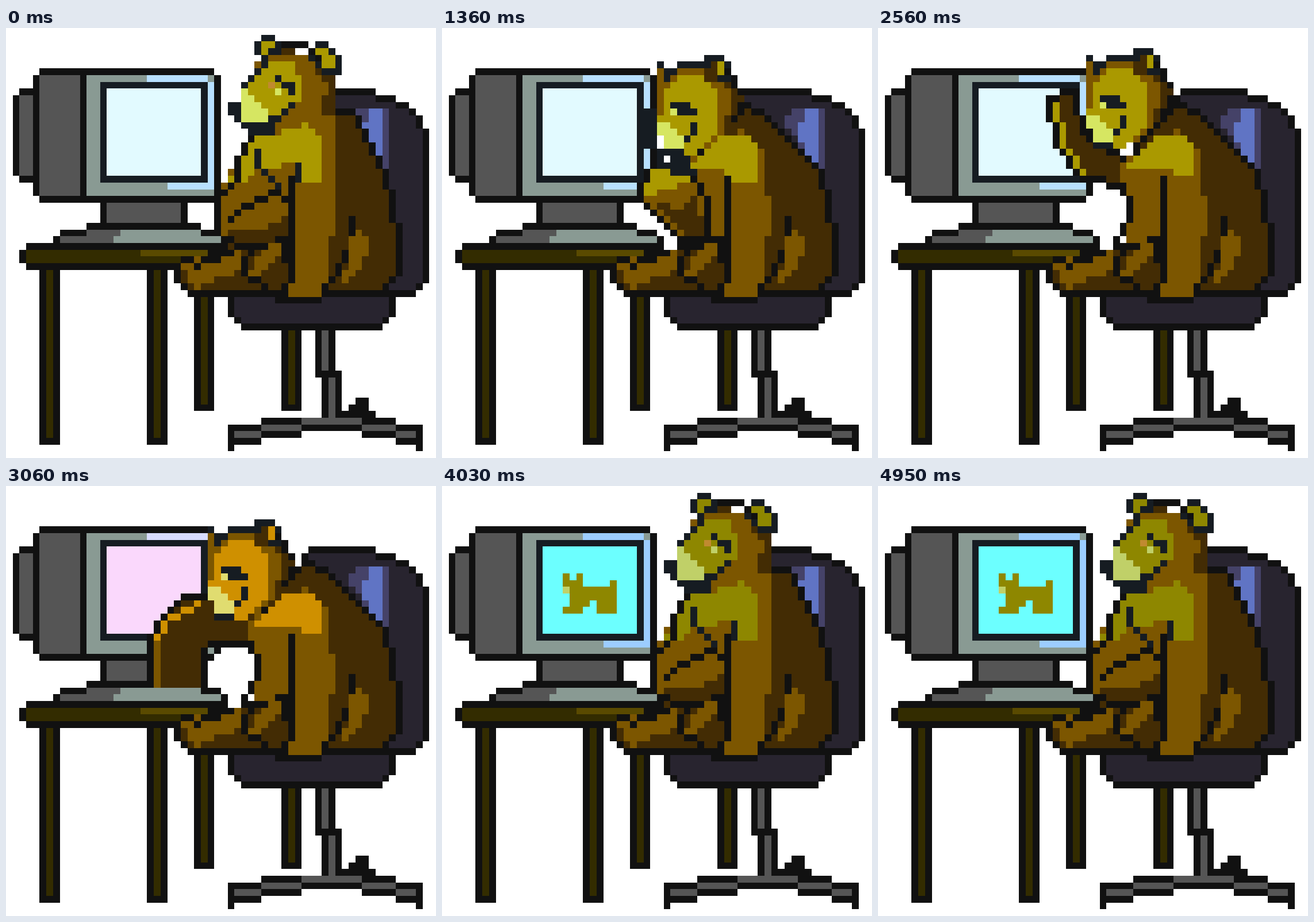
Write an HTML page with a canvas that moves like this. It is 748 px wide and 748 px high and loops after 4.99 s.

```html
<!DOCTYPE html>
<html lang="en">
<head>
<meta charset="utf-8">
<title>Bear at the computer</title>
<style>
html, body { margin: 0; width: 100%; height: 100%; overflow: hidden; background: #fff; }
canvas { display: block; width: 100vw; height: 100vh; image-rendering: pixelated; }
</style>
</head>
<body>
<canvas width="64" height="64"></canvas>
<script>
const SIZE = 64;
const ctx = document.querySelector('canvas').getContext('2d');
const INK = '#111', NAVY = '#161c22', GREY = '#555', SILVER = '#899a93';
const DARK = '#432c04', MID = '#7c5600', DESK = '#332c00', DESK_LIT = '#5a4a00';
const SEAT = '#28242f', BLUE = '#6074c4', VIOLET = '#454268', TAN = '#c08a30';
const TINTS = {
  white: { screen: '#e2faff', glow: '#b8e0ff', fur: '#aa9900', cream: '#d6e662' },
  pink: { screen: '#fad8fc', glow: '#d8dcff', fur: '#cf9000', cream: '#e0dc70' },
  cyan: { screen: '#6cffff', glow: '#9ccdff', fur: '#8e8700', cream: '#c0d068' }
};
let tint;

function box(color, x, y, w = 1, h = 1) {
  ctx.fillStyle = color;
  ctx.fillRect(x, y, w, h);
}
function eachCell(inside, draw) {
  for (let y = 0; y < SIZE; y++)
    for (let x = 0; x < SIZE; x++) if (inside(x, y)) draw(x, y);
}
// Tells whether the centre of a cell lies in a polygon given as x, y, x, y...
const polygon = p => (x, y) => {
  let odd = false;
  for (let i = 0, j = p.length - 2; i < p.length; j = i, i += 2)
    if ((p[i + 1] <= y + .5) !== (p[j + 1] <= y + .5) &&
      x + .5 < p[i] + (y + .5 - p[i + 1]) / (p[j + 1] - p[i + 1]) * (p[j] - p[i])) odd = !odd;
  return odd;
};
function fill(color, ...pts) {
  eachCell(polygon(pts), (x, y) => box(color, x, y));
}
// Fills an area, inking every cell that touches its outside.
function outlined(color, inside, edge = INK) {
  eachCell(inside, (x, y) => {
    const inner = inside(x - 1, y) && inside(x + 1, y) && inside(x, y - 1) && inside(x, y + 1);
    box(inner ? color : edge, x, y);
  });
}
// A box whose corners are cut at 45 degrees.
function panel(color, x, y, w, h, cut = 0) {
  outlined(color, (u, v) => {
    const dx = Math.min(u - x, x + w - 1 - u), dy = Math.min(v - y, y + h - 1 - v);
    return dx >= 0 && dy >= 0 && dx + dy >= cut;
  });
}
function stroke(color, ...p) {
  for (let i = 0; i + 3 < p.length; i += 2) {
    const dx = p[i + 2] - p[i], dy = p[i + 3] - p[i + 1];
    const n = Math.max(Math.abs(dx), Math.abs(dy));
    for (let k = 0; k <= n; k++)
      box(color, Math.round(p[i] + dx * k / n), Math.round(p[i + 1] + dy * k / n));
  }
}
function shifted(dx, dy, draw) {
  ctx.save();
  ctx.translate(dx, dy);
  draw();
  ctx.restore();
}

function chair() {
  panel(SEAT, 33, 36, 25, 9, 2);
  outlined(SEAT, polygon([46, 9, 54, 9, 59.8, 11, 63, 15.5, 63, 38, 60.5, 40, 44, 40, 44, 10]));
  fill(VIOLET, 53, 12, 57, 12, 57, 23, 51, 14);
  fill(BLUE, 54, 12, 56, 12, 56, 21, 53, 16);
  panel(GREY, 46, 44, 3, 8);
  panel(GREY, 47, 51, 3, 8);
  fill(INK, 52, 55, 54, 55, 55, 58, 50, 58);
  for (let x = 33; x <= 61; x++) {
    const d = Math.abs(x - 48), y = 58 + (d > 4) + (d > 10 || x > 57);
    if (d > 4) box(INK, x, y - 1, 1, 3);
    const tip = x === 33 || x === 61;
    box(tip ? INK : GREY, x, y, 1, tip ? 3 : 1);
    if (d <= 4) box(INK, x, 59);
  }
}
function monitor(creature) {
  panel(GREY, 1, 9, 6, 14, 1);
  panel(GREY, 4, 6, 28, 20, 1);
  panel(SILVER, 11, 6, 21, 20, 1);
  box(tint.glow, 21, 7, 9);
  box(tint.glow, 30, 8, 1, 16);
  box(tint.glow, 24, 23, 7);
  box(NAVY, 14, 8, 16, 15);
  box(tint.screen, 15, 9, 14, 13);
  if (creature) {
    box(tint.fur, 18, 15, 8, 4);
    for (const x of [18, 20, 25]) box(tint.fur, x, 13 + (x > 20), 1, 2);
    box(tint.fur, 19, 14);
    box(tint.screen, 18, 16, 1, 2);
    box(tint.screen, 21, 18, 2);
    box(tint.screen, 22, 17);
    box(tint.cream, 18, 15);
  }
  outlined(GREY, polygon([15, 25, 27, 25, 27, 30, 14, 30, 14, 27]));
  box(INK, 12, 29, 17);
}
function desk() {
  fill(INK, 8, 30, 32, 30, 33, 32, 7, 32);
  box(GREY, 12, 30, 5);
  box(GREY, 8, 31, 8);
  box(SILVER, 17, 30, 12);
  box(SILVER, 16, 31, 16);
  panel(DESK, 2, 32, 32, 4, 1);
  box(DESK_LIT, 20, 33, 11);
}

function trunk(sitting) {
  const top = sitting ? [44, 14, 47, 12, 52, 12, 54, 16] : [38, 18, 44, 11, 48, 12, 53, 17];
  outlined(DARK, polygon([42, 40, 42, 22, ...top, 57, 22, 58, 25, 59, 32, 59, 36, 56, 40]));
}
function arm() {
  fill(MID, 43, 23, 47, 23, 49, 26, 48, 37, 46, 41, 40, 41, 43, 37);
  stroke(INK, 42, 22, 42, 37, 40, 40, 46, 40, 48, 37, 51, 31, 51, 28);
  fill(MID, 52, 29, 54, 32, 53, 36, 50, 38);
}
function foot() {
  const leg = polygon([26, 34, 28, 34, 42, 31, 43, 38, 41, 40, 27, 40, 25, 37]);
  outlined(DARK, leg);
  fill(MID, 26, 35, 35, 33, 35, 36, 30, 38, 29, 39, 28, 39);
  fill(MID, 38, 33, 41, 32, 42, 33, 38, 37, 36, 37);
  stroke(INK, 36, 33, 35, 34, 35, 36, 38, 38);
  stroke(INK, 28, 35, 29, 34, 33, 33);
}

function uprightHead(peeking) {
  fill(DARK, 40, 3, 46, 4, 49, 7, 49, 13, 44, 14);
  fill(MID, 38, 4, 45, 4, 48, 9, 46, 14, 40, 16, 36, 10);
  fill(tint.fur, 39, 5, 43, 5, 44, 8, 44, 11, 41, 14, 38, 14, 36, 9);
  fill(tint.cream, 35, 9, 37, 10, 39, 12, 39, 14, 35, 14);
  outlined(tint.fur, polygon([37, 3, 39, 1, 41, 2, 41, 4, 38, 5]), NAVY);
  outlined(tint.fur, polygon([45, 4, 46, 2, 48, 2, 50, 4, 50, 7, 48, 7]), NAVY);
  stroke(INK, 41, 2, 44, 2, 46, 4);
  stroke(NAVY, 38, 5, 35, 8);
  stroke(NAVY, 40, 7, 42, 8, 42, 9);
  stroke(NAVY, 42, 11, 40, 13);
  box(tint.cream, 40, 9);
  box(NAVY, 33, 11, 2, 2);
  if (peeking) {
    box(NAVY, 32, 11, 2, 2);
    box(TAN, 35, 10, 2);
    box(TAN, 35, 13, 2);
    stroke(NAVY, 40, 13, 38, 14, 41, 16);
  } else {
    box(TAN, 39, 8);
    stroke(NAVY, 34, 13, 36, 15, 39, 15, 39, 13);
    box(NAVY, 35, 14, 4);
  }
}
function leaningHead() {
  fill(DARK, 33, 6, 38, 5, 42, 7, 44, 10, 42, 15, 38, 19);
  fill(MID, 31, 9, 34, 6, 38, 6, 42, 9, 42, 12, 40, 17, 36, 19, 31, 16);
  fill(tint.fur, 32, 10, 35, 7, 38, 7, 40, 10, 40, 16, 36, 19, 31, 16);
  fill(tint.cream, 31, 14, 33, 14, 35, 16, 35, 18, 32, 18);
  outlined(tint.fur, polygon([38, 4, 41, 4, 42, 5, 42, 8, 39, 8]), NAVY);
  box(DARK, 38, 5, 2, 3);
  box(MID, 31, 6, 1, 2);
  stroke(NAVY, 31, 5, 32, 7, 34, 5, 38, 5);
  stroke(INK, 41, 6, 43, 9);
  stroke(INK, 43, 11, 42, 13);
  stroke(NAVY, 33, 11, 35, 11);
  stroke(NAVY, 34, 12, 36, 12);
  stroke(NAVY, 36, 14, 36, 15, 35, 16);
  stroke(NAVY, 32, 18, 34, 18);
  box(tint.cream, 33, 12);
}

function sittingBody() {
  fill(MID, 38, 14, 49, 13, 49, 28, 43, 33, 32, 33, 32, 24, 35, 19);
  fill(tint.fur, 36, 16, 44, 13.5, 47, 17, 47, 26, 44, 27, 44, 20, 38, 21, 32, 25, 35, 20);
  fill(DARK, 33, 33, 33, 30, 38, 30, 42, 28, 42, 33);
  stroke(INK, 36, 15, 34, 19, 34, 22, 31, 25, 31, 30, 34, 32, 40, 32);
  stroke(NAVY, 37, 18, 37, 20, 40, 23);
  stroke(NAVY, 43, 20, 43, 25);
  stroke(INK, 33, 28, 35, 26, 39, 24, 42, 25);
}
function peekingBody() {
  fill(MID, 35, 20, 46, 14, 48, 25, 43, 34, 34, 34, 34, 24);
  fill(tint.fur, 34, 17.5, 45, 15, 46, 18, 46, 27, 43, 27, 43, 22, 37, 24, 34, 22);
  fill(DARK, 34, 31, 42, 33, 42, 35, 34, 35);
  stroke(NAVY, 34, 17, 33, 18, 33, 23, 34, 25, 33, 27, 33, 32);
  stroke(NAVY, 35, 19, 35, 21, 37, 25);
  stroke(INK, 38, 26, 41, 26);
  stroke(INK, 35, 30, 37, 28);
}
function leaningChest() {
  fill(MID, 36, 20, 45, 15, 47.5, 18, 48, 27, 43, 32, 37, 32, 37, 25);
  fill(tint.fur, 37, 21, 41, 16, 46, 16, 47, 18, 47, 22, 44, 22, 43, 20.5);
}
function crouchingBody() {
  leaningChest();
  fill(tint.fur, 41, 20, 47, 19, 47, 26, 46, 26);
  outlined(MID, polygon([30, 21, 37, 20, 40, 26, 40, 32, 36, 32, 29, 26]));
  fill(DARK, 32, 26, 36, 27, 38, 25, 39, 31, 36, 31);
  fill(tint.fur, 31, 21, 36, 21, 37, 23, 30, 25);
  fill(NAVY, 32, 18, 36, 18, 38, 22, 36, 22, 32, 21);
  box('#fff', 33, 19);
  box(NAVY, 30, 12, 2, 6);
}
function chestEdge() {
  leaningChest();
  stroke(INK, 35, 23, 37, 25, 37, 28, 35, 31);
}
function strikingBody(reach) {
  shifted(reach, 0, () => {
    outlined(DARK, polygon([39, 16, 27, 16, 23, 19, 21, 23, 21, 31, 30, 31, 30, 24, 39, 24]));
    stroke(tint.fur, 22, 22, 24, 19, 28, 17);
    box(MID, 22, 23, 1, 7);
  });
  chestEdge();
}
function raisingBody() {
  outlined(DARK, polygon([25, 10, 30, 9, 31, 16, 39, 20, 39, 24, 30, 23, 26, 17]));
  stroke(tint.fur, 26, 11, 27, 17, 30, 21);
  chestEdge();
}

const upright = (dx, peeking) => () => shifted(dx, 0, () => uprightHead(peeking));
const leaning = (dx, dy) => () => shifted(dx, dy, leaningHead);
const POSES = {
  sit: { sitting: true, body: sittingBody, head: upright(0, false) },
  turn: { body: peekingBody, head: upright(-2, true) },
  peek: { body: peekingBody, head: upright(-3, true) },
  duck: { body: crouchingBody, head: leaning(1, 0) },
  crouch: { body: crouchingBody, head: leaning(0, 0) },
  raise: { body: raisingBody, head: leaning(0, -1) },
  strike: { body: () => strikingBody(0), head: leaning(-1, 1) },
  smash: { body: () => strikingBody(-2), head: leaning(-1, 1) }
};
// Pose, screen tint and how long each lasts in ms.
const STEPS = [
  ['sit', 'white', 680], ['turn', 'white', 80], ['peek', 'white', 600],
  ['duck', 'white', 600], ['crouch', 'white', 600], ['raise', 'white', 500],
  ['strike', 'pink', 90], ['strike', 'white', 90], ['raise', 'white', 500],
  ['smash', 'cyan', 290], ['sit', 'cyan', 600]
];
// The picture flickers in, quicker near the end.
for (let i = 0; i < 6; i++)
  STEPS.push(['sit', i % 2 ? 'cyan' : 'white', i < 3 ? 80 : 40]);
STEPS[STEPS.length - 3][2] = 40;
const LOOP = STEPS.reduce((sum, step) => sum + step[2], 0);

function paint([poseName, tintName]) {
  const pose = POSES[poseName];
  tint = TINTS[tintName];
  box('#fff', 0, 0, SIZE, SIZE);
  for (const x of [5, 21]) panel(DESK, x, 35, 3, 27);
  for (const x of [28, 41]) panel(DESK, x, 38, 3, 19);
  chair();
  monitor(tintName === 'cyan');
  trunk(pose.sitting);
  pose.body();
  arm();
  desk();
  foot();
  pose.head();
}

let shown;
function tick() {
  let t = performance.now() % LOOP;
  const step = STEPS.find(s => (t -= s[2]) < 0);
  if (step !== shown) paint(shown = step);
  requestAnimationFrame(tick);
}
tick();
</script>
</body>
</html>
```
